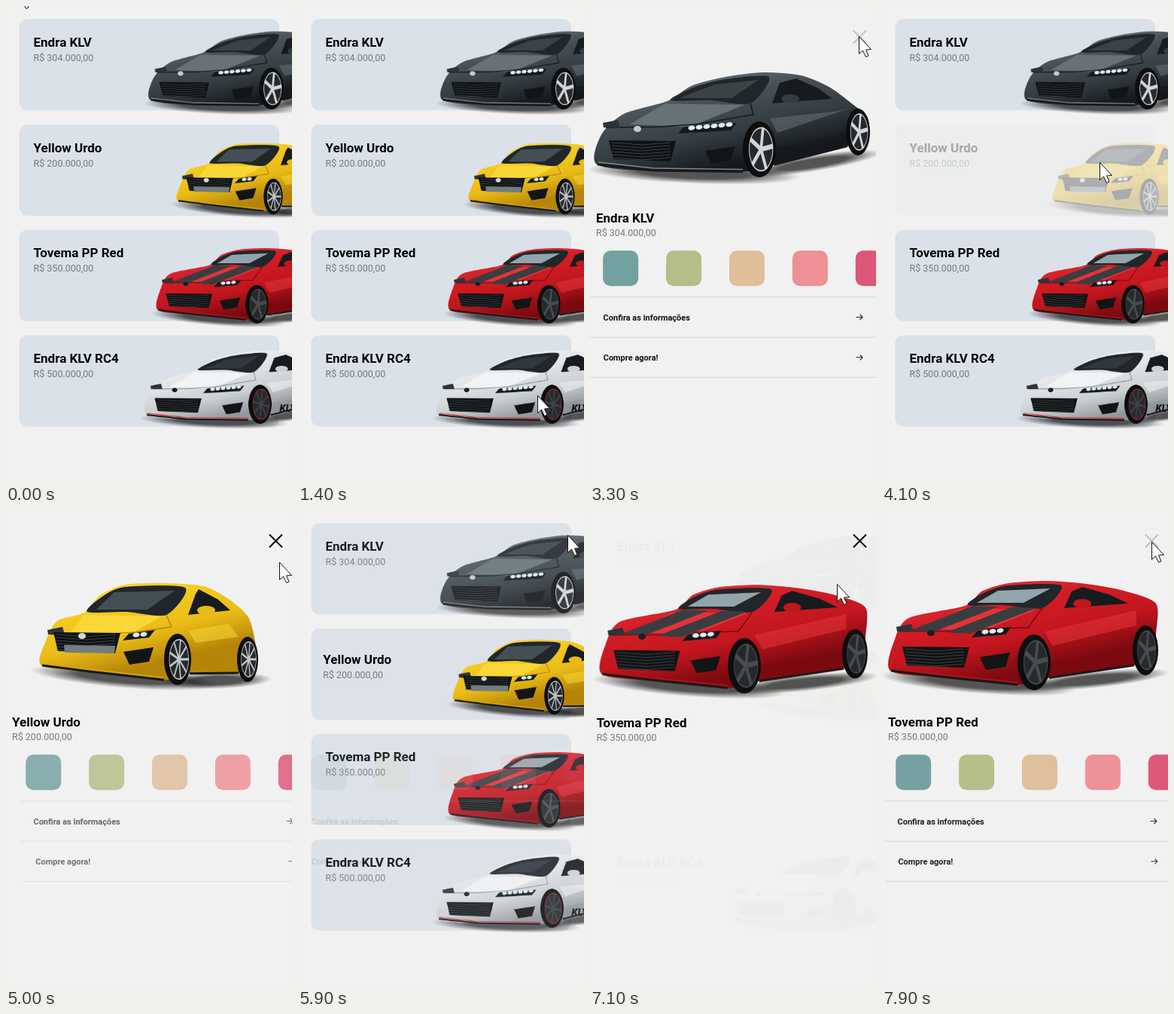
Recreate the animation shown at these times as an HTML page with a canvas. Size 380 by 631 pixels, loop 8 s.

```html
<!DOCTYPE html>
<html lang="pt-BR">
<head>
<meta charset="utf-8">
<title>Carros</title>
<style>
html, body { margin: 0; width: 100%; height: 100%; overflow: hidden; background: #f1f1f1; }
canvas { display: block; width: 100vw; height: 100vh; }
</style>
</head>
<body>
<canvas id="stage"></canvas>
<script>
const W = 380, H = 631, LOOP = 8000, STEP = 100, MOVE = 350;
const FONT = 'Roboto, "Noto Sans", sans-serif';
const canvas = document.getElementById('stage');
const ctx = canvas.getContext('2d');
const dpr = Math.max(1, window.devicePixelRatio || 1);
canvas.width = W * dpr;
canvas.height = H * dpr;

const clamp = (v, a = 0, b = 1) => Math.min(b, Math.max(a, v));
const mix = (a, b, u) => a + (b - a) * u;
const between = (a, b, u) => [mix(a[0], b[0], u), mix(a[1], b[1], u)];
const easeOut = u => 1 - (1 - clamp(u)) ** 3;

// ---------- car painting ----------
let g;

function poly(fill, ...pts) {
  g.beginPath();
  pts.forEach(p => g.lineTo(...p));
  g.closePath();
  g.fillStyle = fill;
  g.fill();
}

// Closed curve running softly through every point
function blob(fill, ...pts) {
  const n = pts.length, k = 0.13, at = i => pts[(i + n) % n];
  g.beginPath();
  g.moveTo(...pts[0]);
  pts.forEach((b, i) => {
    const a = at(i - 1), c = at(i + 1), d = at(i + 2);
    g.bezierCurveTo(b[0] + (c[0] - a[0]) * k, b[1] + (c[1] - a[1]) * k,
      c[0] - (d[0] - b[0]) * k, c[1] - (d[1] - b[1]) * k, ...c);
  });
  g.fillStyle = fill;
  g.fill();
}

function line(color, width, ...pts) {
  g.beginPath();
  pts.forEach(p => g.lineTo(...p));
  g.strokeStyle = color;
  g.lineWidth = width;
  g.stroke();
}

function oval(fill, x, y, rx, ry = rx) {
  g.beginPath();
  g.ellipse(x, y, rx, ry, 0, 0, 7);
  g.fillStyle = fill;
  g.fill();
}

function shade(y1, y2, colors) {
  const f = g.createLinearGradient(100, y1, 130, y2);
  colors.forEach((c, i) => f.addColorStop(i / (colors.length - 1), c));
  return f;
}

// Soft shadow stretched along the line a-b
function shadow(a, b, depth) {
  const [x, y] = between(a, b, 0.5);
  g.save();
  g.translate(x, y);
  g.rotate(Math.atan2(b[1] - a[1], b[0] - a[0]));
  g.scale(Math.hypot(b[0] - a[0], b[1] - a[1]) / 2, depth);
  const f = g.createRadialGradient(0, 0, 0.5, 0, 0, 1);
  f.addColorStop(0, 'rgba(0,0,0,.65)');
  f.addColorStop(1, 'rgba(0,0,0,0)');
  oval(f, 0, 0, 1);
  g.restore();
}

function wheel([x, y, rx, ry], rim) {
  oval('#0d0e0f', x, y, rx, ry);
  g.save();
  g.translate(x + rx * 0.1, y);
  g.scale(rx * 0.74, ry * 0.8);
  oval('#26292b', 0, 0, 1);
  for (let i = 0; i < rim.spokes; i++) {
    const a = i / rim.spokes * Math.PI * 2 - 1.4;
    line(rim.color, 1.1 / rim.spokes, [0, 0], [Math.cos(a), Math.sin(a)]);
  }
  g.beginPath();
  g.arc(0, 0, 0.96, 0, 7);
  g.strokeStyle = rim.ring || rim.color;
  g.lineWidth = 0.06;
  g.stroke();
  g.restore();
}

// A three-quarter view, nose to the left, built from a few landmarks
function paintCar({ nose, chin, hood, cowl, roof, back, tail, front, rear, grille, paint, rim, glass, lip, ...extra }) {
  const [fx, fy, frx, fry] = front, [rx, ry, rrx, rry] = rear;
  const edge = hood[1] + 18;
  const pillar = [213, cowl[1] + 3];
  const chinEnd = [fx - frx, fy + fry * 0.8];
  const sillA = [fx + frx - 2, fy + fry * 0.55], sillB = [rx - rrx + 2, ry + rry * 0.6];
  const noseL = [nose + 12, edge], noseR = [nose + 108, edge + 5];
  // u runs across the bonnet, v from windscreen to nose
  const onHood = (u, v) => between(between(cowl, pillar, u), between(noseL, noseR, u), v);

  shadow([nose - 14, chin + 6], [fx + 55, fy + fry], 14);
  shadow([fx - 20, fy + fry - 4], [rx + 32, ry + rry - 4], 11);
  blob(shade(roof[1], chin + 15, paint),
    [nose, chin], [nose + 6, mix(chin, edge, 0.8)], hood, cowl, between(cowl, [roof[0] - 12, roof[1] - 9], 0.5),
    roof, [mix(roof[0], back[0], 0.5), back[1] - 4], back, between(back, [tail[0] + 6, tail[1] - 8], 0.5),
    tail, [rx + rrx - 3, ry - rry * 0.6], [rx + rrx - 3, ry + rry * 0.4], sillB, sillA, chinEnd,
    [mix(nose, fx, 0.35), chin + 9]);

  // Bonnet, shoulder and lower door
  poly(paint[0], onHood(0.04, 0.1), onHood(0.98, 0.05), onHood(1, 0.85), onHood(0.2, 0.85));
  line(paint[3], 1.5, onHood(0, 1), onHood(0.6, 0.9), onHood(1, 0.75), [fx - 8, fy - fry - 9], pillar);
  g.globalAlpha = 0.55;
  poly(paint[0], [fx + 14, fy - fry - 4], [tail[0] - 26, tail[1] + 9], [rx - 12, ry - rry], [fx + 24, fy - 22]);
  poly(paint[3], [sillA[0], sillA[1] - 22], [sillB[0], sillB[1] - 18], sillB, sillA);
  g.globalAlpha = 1;

  // Glass
  blob('#20262a', [cowl[0] + 4, cowl[1] - 1], between(cowl, [roof[0] - 8, roof[1] - 4], 0.5),
    [roof[0], roof[1] + 3], [238, back[1] + 2], pillar, [160, cowl[1] - 1]);
  poly(glass, [cowl[0] + 16, cowl[1] - 4], [roof[0] - 14, roof[1] + 10], [224, back[1] + 6], [188, cowl[1] - 4]);
  const windowEnd = [mix(back[0], tail[0], 0.6), pillar[1] - 6];
  poly('#171b1e', [242, pillar[1]], [252, back[1] + 10], [back[0] - 6, back[1] + 4],
    between(back, windowEnd, 0.55), windowEnd);
  oval(paint[2], 266, pillar[1] - 6, 12, 6);

  // Face
  const light = [[nose + 108, edge + 8], [nose + 116, edge - 1], [fx - 30, edge - 6], [fx - 38, edge + 4]];
  poly('#14191c', ...light);
  g.save();
  g.translate(light[1][0] + 6, edge);
  g.transform(1, -0.09, 0, 1, 0, 0);
  for (let x = 0; x < fx - nose - 162; x += 10) oval('#dcecf8', x + 4, 1, 4.5, 3);
  g.restore();
  poly('#2c3439', [nose + 8, edge - 6], [nose + 28, edge - 10], [nose + 31, edge], [nose + 9, edge]);
  poly('#101314', [nose + 16, grille], [nose + 105, grille + 1], [nose + 98, grille + 28], [nose + 22, grille + 25]);
  for (let i = 0; i < 6; i++) {
    const y = grille + 3 + i * 4;
    line('#474d50', 0.8, [nose + 20, y], [nose + 60, y + 3], [nose + 98, y]);
  }
  poly('#121516', [fx - 72, chin - 18], [fx - 32, chin - 24], [fx - 38, chin - 5], [fx - 64, chin - 1]);
  line('#17191a', 3, [nose + 1, chin], [mix(nose, fx, 0.35), chin + 8], chinEnd);
  line(lip, 1.5, [nose + 2, chin - 3], [mix(nose, fx, 0.35), chin + 5], [chinEnd[0], chinEnd[1] - 3]);
  line('#17191a', 3, sillA, sillB);

  if (extra.stripe) {
    for (const u of [0.1, 0.6]) {
      poly(extra.stripe, onHood(u, 0), onHood(u + 0.33, 0), onHood(u + 0.33, 0.95), onHood(u, 0.95));
    }
  }
  if (extra.plate) poly(extra.plate, [nose + 30, grille + 17], [nose + 98, grille + 18], [nose + 97, grille + 28], [nose + 31, grille + 27]);
  oval(extra.badge, nose + 54, edge + 2, 5, 4);
  wheel(front, rim);
  wheel(rear, rim);
  if (extra.decal) {
    g.font = `italic 900 19px ${FONT}`;
    g.fillStyle = '#15181a';
    g.fillText(extra.decal, 262, 204);
  }
}

function sprite(look) {
  const c = document.createElement('canvas');
  c.width = 800;
  c.height = 520;
  g = c.getContext('2d');
  g.scale(2, 2);
  g.lineJoin = 'round';
  paintCar(look);
  return c;
}

const grey = {
  nose: 9, chin: 210, grille: 178, hood: [45, 143], cowl: [103, 126], roof: [180, 94], back: [280, 92], tail: [350, 131],
  front: [225, 190, 22, 37], rear: [356, 167, 16, 31],
  paint: ['#667178', '#465056', '#343d42', '#15191c'], glass: '#3c4346', lip: '#7d878c', badge: '#c5ccd0',
  rim: { color: '#d3d5d6', spokes: 5 }
};
const yellow = {
  nose: 47, chin: 206, grille: 162, hood: [68, 147], cowl: [104, 136], roof: [158, 99], back: [262, 101], tail: [322, 142],
  front: [228, 198, 18, 34], rear: [321, 198, 14, 30],
  paint: ['#f8d736', '#f4ca20', '#e9bb17', '#b58509'], glass: '#444f55', lip: '#d9a70e', badge: '#d5d8da', plate: '#737c80',
  rim: { color: '#c3c8ca', spokes: 9 }
};
const red = {
  nose: 11, chin: 213, grille: 181, hood: [36, 143], cowl: [110, 127], roof: [168, 97], back: [272, 98], tail: [364, 124],
  front: [202, 202, 22, 37], rear: [350, 186, 17, 33],
  paint: ['#e3333a', '#d31d26', '#c2161e', '#7c0a10'], glass: '#93a5ac', lip: '#b3151c', badge: '#1c1e20', stripe: '#3a3d40',
  rim: { color: '#484c4f', spokes: 5 }
};
const white = {
  ...grey,
  paint: ['#f2f3f4', '#e4e6e8', '#cdd1d4', '#8f969a'], glass: '#30373d', lip: '#e22a30', badge: '#17191b', decal: 'KLV',
  rim: { color: '#3d4144', spokes: 8, ring: '#a5282d' }
};

// x, y, s place the car inside its list card
const cars = [
  { name: 'Endra KLV', price: '304.000,00', x: 185, y: -32, s: 0.745, art: sprite(grey) },
  { name: 'Yellow Urdo', price: '200.000,00', x: 195.4, y: 114, s: 0.7, art: sprite(yellow) },
  { name: 'Tovema PP Red', price: '350.000,00', x: 194, y: 256, s: 0.69, art: sprite(red) },
  { name: 'Endra KLV RC4', price: '500.000,00', x: 180, y: 395, s: 0.7, art: sprite(white) }
];

// ---------- timeline ----------
const visits = [
  { car: 0, press: 1600, open: 1800, close: 3400 },
  { car: 1, press: 4100, open: 4200, close: 5720 },
  { car: 2, press: 6800, open: 6850, close: 8100 }
];

// Where the pointer rests, and when it gets there
const stops = [
  { t: 100, at: [17, -24] }, { t: 200, at: [280, 362] }, { t: 1000, at: [190, 2] }, { t: 1400, at: [318, 516] },
  { t: 1600, at: [236, 92] }, { t: 2100, at: [221, 68] }, { t: 3100, at: [357, 40] }, { t: 3900, at: [289, 207] },
  { t: 5000, at: [363, 69] }, { t: 5500, at: [358, 33] }, { t: 6500, at: [298, 368] }, { t: 7100, at: [328, 98] },
  { t: 7700, at: [358, 42] }
];

function cursorAt(t) {
  const i = stops.findIndex(s => s.t > t);
  if (i === 0) return stops[0].at;
  if (i < 0) return stops[stops.length - 1].at;
  const a = stops[i - 1], b = stops[i], travel = Math.min(300, b.t - a.t);
  return between(a.at, b.at, clamp(1 - (b.t - t) / travel));
}

// ---------- screen ----------
function withAlpha(alpha, draw) {
  if (alpha < 0.004) return;
  ctx.save();
  ctx.globalAlpha = clamp(alpha);
  draw();
  ctx.restore();
}

function text(str, x, y, font, color) {
  ctx.font = `${font} ${FONT}`;
  ctx.fillStyle = color;
  ctx.fillText(str, x, y);
}

function box(color, x, y, w, h, r) {
  ctx.fillStyle = color;
  ctx.beginPath();
  ctx.roundRect(x, y, w, h, r);
  ctx.fill();
}

function stroke(color, width, ...paths) {
  ctx.beginPath();
  for (const [first, ...rest] of paths) {
    ctx.moveTo(...first);
    rest.forEach(p => ctx.lineTo(...p));
  }
  ctx.strokeStyle = color;
  ctx.lineWidth = width;
  ctx.stroke();
}

// p = 0 in the list, 1 in the detail view
function drawCar(i, p) {
  const c = cars[i], s = mix(c.s, 1, p);
  ctx.drawImage(c.art, mix(c.x, 0, p), mix(c.y, 0, p), 400 * s, 260 * s);
  const x = mix(36.5, 8, p), y = mix(54 + 139.7 * i, 287, p);
  text(c.name, x, y, '700 17px', '#050505');
  text('R$ ' + c.price, x, y + mix(19, 18.3, p), '400 12.5px', '#77797c');
}

function drawClose(alpha) {
  const x = 358.5, y = 41, r = 8.5;
  withAlpha(alpha, () => stroke('#000', 2,
    [[x - r, y - r], [x + r, y + r]], [[x + r, y - r], [x - r, y + r]]));
}

function slideIn(alpha, age, delay, tau, draw) {
  const k = age < delay ? 0 : 1 - Math.exp((delay - age) / tau);
  withAlpha(alpha * k, () => {
    ctx.translate(50 * (1 - k), 0);
    draw();
  });
}

const rule = y => box('#d6d8d9', 0, y, W, 1.2, 0);

function drawRow(label, y) {
  rule(y + 26);
  text(label, 17.5, y + 4, '600 11px', '#101010');
  stroke('#222', 1.1, [[353.5, y], [362, y]], [[358.5, y - 3.5], [362, y], [358.5, y + 3.5]]);
}

function drawDetail(alpha, age) {
  slideIn(alpha, age, 605, 114, () => {
    ['#73a0a1', '#b4be88', '#dfbe9b', '#ed9196', '#dc5678'].forEach((color, i) =>
      box(color, 17.2 + 83.9 * i, 324.3, 47, 47, 10));
  });
  slideIn(alpha, age, 669, 135, () => {
    rule(385.3);
    drawRow('Confira as informações', 412.5);
  });
  slideIn(alpha, age, 680, 145, () => drawRow('Compre agora!', 465.8));
}

const arrow = new Path2D('M0 0V23L5 18.5L9 27L12.5 25.5L9 17.5L16 17Z');

function drawCursor([x, y]) {
  ctx.save();
  ctx.translate(x + 0.5, y + 0.5);
  ctx.fillStyle = '#fff';
  ctx.fill(arrow);
  ctx.strokeStyle = '#111';
  ctx.lineWidth = 1;
  ctx.stroke(arrow);
  ctx.restore();
}

function render(t) {
  const visit = visits.find(v => t >= v.press && t < v.close + MOVE);
  const p = visit ? easeOut((t - visit.open) / MOVE) - easeOut((t - visit.close) / MOVE) : 0;
  const moving = visit && t >= visit.open;

  ctx.setTransform(dpr, 0, 0, dpr, 0, 0);
  ctx.imageSmoothingQuality = 'high';
  box('#f1f1f1', 0, 0, W, H, 0);

  cars.forEach((c, i) => {
    const chosen = visit && visit.car === i;
    withAlpha(chosen && !moving ? 0.3 : 1 - p, () => {
      box('#dbe1e9', 17.5, 17.3 + 139.7 * i, 345.5, 121, 11);
      if (!(chosen && moving)) drawCar(i, 0);
    });
  });
  if (moving) {
    drawDetail(p, Math.min(t, visit.close) - visit.open);
    drawCar(visit.car, p);
    drawClose(t >= visit.close - 200 ? 0.2 * p : p);
  }
  drawCursor(cursorAt(t));
}

function tick() {
  const t = performance.now() % LOOP;
  render(t - t % STEP);
  requestAnimationFrame(tick);
}
tick();
</script>
</body>
</html>
```
